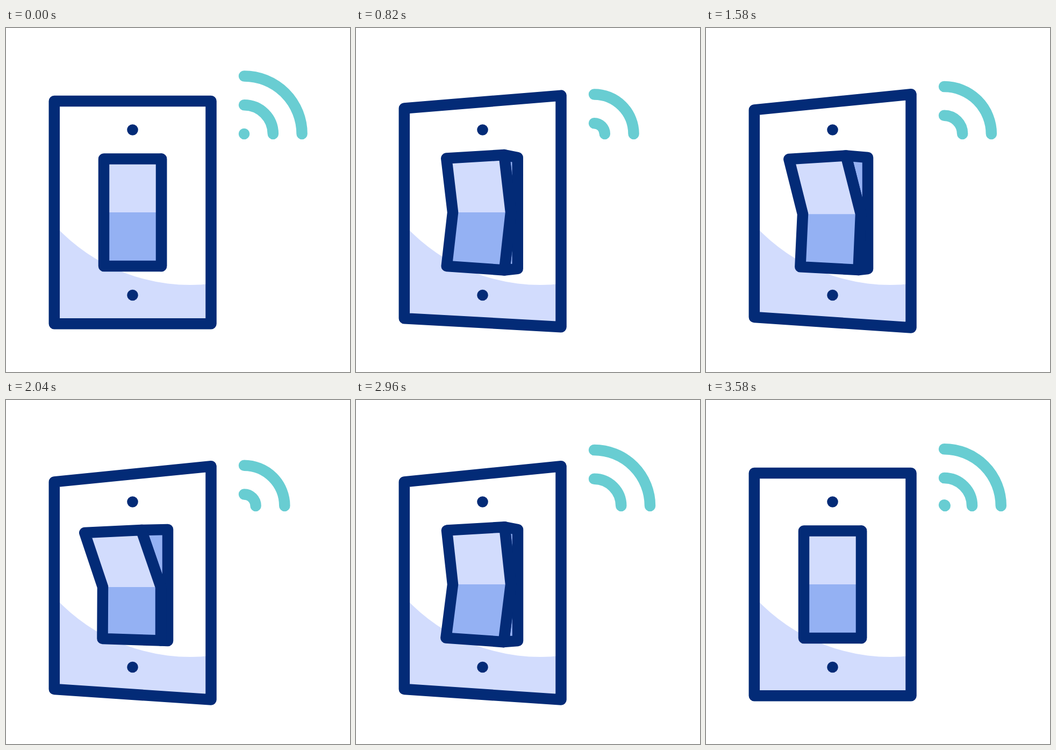
An HTML page for the animation above (3600 ms loop, 640x640 px).

```html
<!DOCTYPE html>
<html lang="en">
<head>
<meta charset="utf-8">
<title>Smart switch</title>
<style>
  html, body { margin: 0; width: 100%; height: 100%; overflow: hidden; background: #fff; }
  svg { display: block; width: 100vw; height: 100vh; }
  .line { fill: none; stroke: #032b77; stroke-width: 20.5; stroke-linejoin: round; stroke-linecap: round; }
  .wave { fill: none; stroke: #68cdd2; stroke-width: 20.5; stroke-linecap: round; }
  .dark { fill: #032b77; }
  .light { fill: #d2dcfd; }
  .mid { fill: #94b1f3; }
</style>
</head>
<body>
<svg viewBox="0 0 640 640">
  <path id="shade" class="light"/>
  <path id="plate" class="line"/>
  <circle class="dark" cx="235.5" cy="189.5" r="10.3"/>
  <circle class="dark" cx="235.5" cy="497" r="10.3"/>
  <path id="side" class="line" style="fill:#94b1f3"/>
  <path id="face" class="mid"/>
  <path id="upper" class="light"/>
  <path id="rim" class="line"/>
  <g id="waves"></g>
</svg>
<script>
const LOOP = 3600, BEAT = 600, GAP = 53.75;
const LEFT = 182, RIGHT = 289, TOP = 243.5, FOLD = 343, BOTTOM = 443;

const ease = (t, a, b) => {
  const u = Math.min(1, Math.max(0, (t - a) / (b - a)));
  return u * u * (3 - 2 * u);
};
const mix = (a, b, k) => a + (b - a) * k;
const poly = (...pts) => "M" + pts.map(p => p.join(" ")).join("L") + "Z";
const setPath = (id, d) => document.getElementById(id).setAttribute("d", d);

// How far the switch is turned, and how far its two halves stick out.
const moves = [
  { from: 20,   to: 900,  turn: 1, top: 12.2, low: 11.7 },
  { from: 1200, to: 1850, turn: 1, top: 35,   low: 0 },
  { from: 2040, to: 2400, turn: 1, top: 0,    low: 23.5 },
  { from: 2700, to: 3020, turn: 1, top: 12.2, low: 11.7 },
  { from: 2980, to: 3560, turn: 0, top: 0,    low: 0 }
];
const track = (t, key) =>
  moves.reduce((v, m) => mix(v, m[key], ease(t, m.from, m.to)), 0);

function drawPlate(t) {
  const k = ease(t, 20, 1120) * (1 - ease(t, 2980, 3560));
  const lt = 136 + 16.4 * k, rt = 136 - 12.7 * k;
  const lb = 550.3 - 12.3 * k, rb = 550.3 + 7.2 * k;
  setPath("plate", poly([89.8, lt], [381.5, rt], [381.5, rb], [89.8, lb]));
  setPath("shade", `M90 366.6A343 343 0 0 0 381.5 475.8V${rb}L90 ${lb}Z`);
}

function drawRocker(t) {
  const turn = track(t, "turn"), top = track(t, "top"), low = track(t, "low");
  const lx = LEFT - 2.5 * turn, rx = RIGHT - turn;

  // A tip swings out to the left, its height following a parabola.
  const leftTip = (r, y, lin, quad) => [lx - 0.95 * r, y + lin * r + quad * r * r];
  const rightTip = (r, y, lin, quad) => [rx - 1.04 * r, y + lin * r + quad * r * r];
  const lt = leftTip(top, TOP + 1.5 * turn, -0.345, 0.0115);
  const rt = rightTip(top, TOP - 2.5 * turn, -0.645, 0.0192);
  const lb = leftTip(low, BOTTOM + turn, 0.18, -0.0227);
  const rb = rightTip(low, BOTTOM + 4.5 * turn, 0.785, -0.0452);

  const fold = FOLD + Math.abs(top - low) / 7.5;
  const seam = FOLD + Math.max(0, top - low) / 7;
  const lm = [LEFT - 2 * turn, fold], rm = [rx, fold];
  const backX = RIGHT + 12 * turn;
  const front = poly(lt, rt, rm, rb, lb, lm);

  setPath("side", poly(rt, [backX, TOP - 2.5 * turn], [backX, BOTTOM + 5 * turn], rb, rm));
  setPath("face", front);
  setPath("rim", front);
  setPath("upper", poly(lt, rt, [rx, seam], [lm[0], seam]));
}

const waves = [-1, 0, 1, 2].map(step => {
  const el = document.createElementNS("http://www.w3.org/2000/svg", "path");
  el.setAttribute("class", "wave");
  document.getElementById("waves").append(el);
  return { el, step };
});

function drawWaves(t) {
  const phase = t % BEAT / BEAT;
  for (const { el, step } of waves) {
    const pos = (phase + step) * GAP;
    const r = Math.max(0.01, Math.abs(pos));
    const fade = step === 2 ? Math.max(0, 1 - phase * BEAT / 140) : 1;
    el.setAttribute("opacity", pos > -2 ? fade : 0);
    el.setAttribute("d", `M443 ${197 - r}A${r} ${r} 0 0 1 ${443 + r} 197`);
  }
}

let start;
function draw(now) {
  start ??= now;
  const t = Math.max(0, now - start) % LOOP;
  drawPlate(t);
  drawRocker(t);
  drawWaves(t);
  requestAnimationFrame(draw);
}
draw(performance.now());
</script>
</body>
</html>
```
